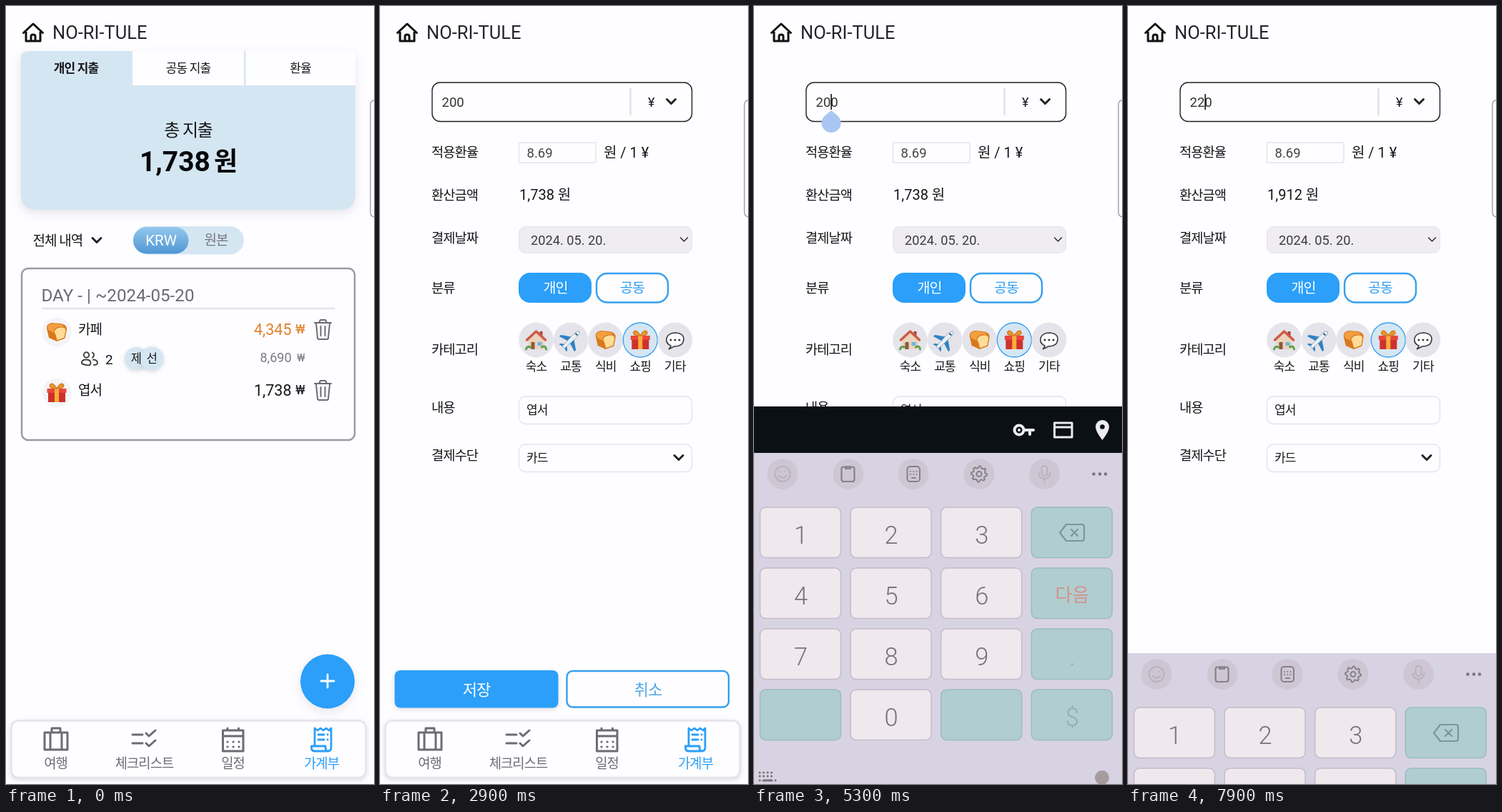
These frames come from a looping animation (515 px wide and 1088 px high, 8 s). An HTML page:

```html
<!DOCTYPE html>
<html lang="ko">
<head>
<meta charset="utf-8">
<style>
html, body { margin: 0; width: 100%; height: 100%; overflow: hidden; background: #fefdff; }
svg { display: block; width: 515px; height: 1088px; }
text { font-family: Roboto, "Noto Sans CJK KR", "Noto Sans CJK", sans-serif; white-space: pre; }
.ko { letter-spacing: -.05em; }
.line { fill: none; stroke-linecap: round; stroke-linejoin: round; }
.soft { filter: drop-shadow(0 5px 7px rgba(40, 50, 70, .11)); }
.near { filter: drop-shadow(0 2px 3px rgba(40, 50, 70, .17)); }
</style>
</head>
<body>
<svg id="stage" viewBox="0 0 515 1088">
  <defs>
    <linearGradient id="pill" x2="0" y2="1">
      <stop stop-color="#93c8ed"/><stop offset="1" stop-color="#4f96d3"/>
    </linearGradient>
    <g id="bread">
      <path d="M-14-5Q-15-11-7-13L5-12Q14-11 14-4L11 9 0 13-11 8Z" fill="#d9781f"/>
      <path d="M-13-6Q-13-11-6-12L5-11Q10-10 10-7L-2-5-4 1-12-3Z" fill="#f2a03f"/>
      <path d="M-4 0Q-4-5 4-7 13-8 13-2L11 8 0 12-2 4Z" fill="#ffdc98" stroke="#d77c20" stroke-width="1.3"/>
    </g>
    <g id="gift">
      <path d="M-12-2H12V13H-12Z" fill="#cf302d"/>
      <path d="M-13.500-6H13.500V0H-13.500Z" fill="#e8463c"/>
      <path d="M-3-6H3V13H-3Z" fill="#f5b03a"/>
      <path d="M0-6Q-12-6-9-12-5-15 0-6 5-15 9-12 12-6 0-6Z" fill="#e9962e" stroke="#d57d22" stroke-width="1.5"/>
    </g>
    <g id="house">
      <path d="M5-12H9V-4H5Z" fill="#a7473c"/>
      <path d="M-11-1 0-10 11-1V13H-11Z" fill="#ead4bd"/>
      <path d="M-13 0 0-12 13 0" class="line" stroke="#cf5a45" stroke-width="3.5"/>
      <path d="M-7 3H-2V13H-7Z" fill="#8d573f"/>
      <path d="M2 3H8V8H2Z" fill="#6fb5dc"/>
      <path d="M-14 13Q-13 8-8 10M14 13Q13 7 8 10" class="line" stroke="#58a149" stroke-width="3"/>
    </g>
    <g id="plane" transform="rotate(45)">
      <path d="M-2-4-15 5V8L-2 4ZM2-4 15 5V8L2 4ZM-2 10-7 14V16L0 14 7 16V14L2 10Z" fill="#2f83c4"/>
      <path d="M0-17Q4-14 3-6L2 15H-2L-3-6Q-4-14 0-17Z" fill="#e9f0f5" stroke="#8fa6b5" stroke-width=".8"/>
      <path d="M-2-11H2" stroke="#305b7c" stroke-width="2"/>
    </g>
    <g id="bubble">
      <path d="M-6 8Q-13 5-12-2-10-10 1-10 13-9 12 0 11 9-1 9L-9 13Q-6 11-6 8Z" fill="#fff" stroke="#3b3b40" stroke-width="1.6"/>
      <path d="M-6 0h.1M0 0h.1M6 0h.1" class="line" stroke="#3b3b40" stroke-width="3"/>
    </g>
  </defs>
  <g id="list"></g>
  <g id="form"></g>
  <g id="nav"></g>
  <g id="head"></g>
  <g id="edit">
    <rect id="caret" y="123" width="1.6" height="22" fill="#111"/>
    <path id="drop" d="M0 146 9.5 154A13.5 13.5 0 1 1-9.5 154Z" fill="#a9c6f3"/>
  </g>
  <rect id="dark" width="515" height="600" fill="#0b1016"/>
  <g id="fill"></g>
  <g id="keys"></g>
</svg>
<script>
const $ = id => document.getElementById(id);
const BLUE = '#2b9ff9', PALE = '#d5e6f3', GREY = '#6d6c71';

// y is the vertical centre of the text
const text = (x, y, s, size, { fill = '#17171a', at = 'start', w = 400, cls = '', id = '' } = {}) =>
  `<text x="${x}" y="${(y + size * .37).toFixed(1)}" font-size="${size}" fill="${fill}" text-anchor="${at}" font-weight="${w}" class="${cls}" id="${id}">${s}</text>`;
const ko = (x, y, s, size, o = {}) => text(x, y, s, size, { cls: 'ko', ...o });
const mid = (x, y, s, size, o = {}) => ko(x, y, s, size, { at: 'middle', ...o });
const box = (x, y, w, h, r, fill, stroke = 'none', sw = 0, cls = '') =>
  `<rect x="${x}" y="${y}" width="${w}" height="${h}" rx="${r}" fill="${fill}" stroke="${stroke}" stroke-width="${sw}" class="${cls}"/>`;
const disc = (x, y, r, fill, more = '') => `<circle cx="${x}" cy="${y}" r="${r}" fill="${fill}" ${more}/>`;
const line = (d, stroke = GREY, w = 2.5, more = '') =>
  `<path d="${d}" class="line" stroke="${stroke}" stroke-width="${w}" ${more}/>`;
const icon = (name, x, y) => `<use href="#${name}" x="${x}" y="${y}"/>`;
const arrow = (x, y, r, w) => line(`M${x - r} ${y - r / 2}l${r} ${r} ${r}-${r}`, '#222', w);

const trash = y => line(`M432 ${y - 9}h23M438 ${y - 9}l2-4h7l2 4M434 ${y - 8}l2 20q0 2 2 2h11q2 0 2-2l2-20M440.500 ${y - 4}v13M446.500 ${y - 4}v13`, GREY, 2);
const won = (y, num, size, fill) =>
  text(399.5, y, num, size, { fill, at: 'end' }) + text(418.5, y, '₩', size * .84, { fill, at: 'end' });

$('head').innerHTML =
  line('M24.500 37.500 38 25 51.500 37.500M28 36V49H48V36M35 49V42.500Q35 40 38 40T41 42.500V49', '#111', 3) +
  text(65, 36.500, 'NO-RI-TULE', 25.5, { fill: '#242428' }) +
  box(510, 131.500, 20, 163.500, 6, '#fefdff', '#98979c', 1.3);

$('list').innerHTML =
  `<g class="soft"><path d="M20.500 73Q20.500 63 31 63H479Q489 63 489 73V263Q489 285 467 285H43Q20.500 285 20.500 263Z" fill="#fefdff"/>
   <path d="M20.500 73Q20.500 63 31 63H177V111H489V263Q489 285 467 285H43Q20.500 285 20.500 263Z" fill="${PALE}"/></g>` +
  box(333, 63, 2.5, 49, 0, PALE) +
  mid(98, 86.500, '개인 지출', 17, { w: 700 }) + mid(255, 86.500, '공동 지출', 17) + mid(412, 86.500, '환율', 17) +
  mid(255, 173, '총 지출', 24) +
  text(286, 217, '1,738', 39, { at: 'end', w: 700, fill: '#08080a' }) + text(291, 217, '원', 36, { w: 700, fill: '#08080a' }) +
  ko(37.500, 327.500, '전체 내역', 19) + arrow(127, 327.500, 6, 3) +
  box(178, 308, 155, 39.5, 19.7, PALE) + box(178, 309, 77.5, 37.5, 18.7, 'url(#pill)') +
  mid(217, 327, 'KRW', 20.5, { fill: '#fff', cls: '' }) + mid(294, 326.500, '원본', 19, { fill: '#77767b' }) +
  box(22, 367, 466, 240, 9, 'none', '#9b9a9f', 2.5) +
  text(49.500, 403.500, 'DAY - | ~2024-05-20', 24.2, { fill: '#6c6b70' }) +
  line('M51 423H459', '#e3e2e8', 2.5) +
  [['bread', '카페', 456], ['gift', '엽서', 541]].map(([name, s, y]) =>
    disc(71, y, 20.5, '#f4f4f6') + icon(name, 71, y) + ko(101, y - 4.5, s, 19) + trash(y - 4)).join('') +
  won(451.500, '4,345', 21.5, '#e4802c') + won(491, '8,690', 18, '#7c7b80') + won(536.500, '1,738', 21.5, '#17171a') +
  line('M106 499Q106 494.500 112 494.500T118.500 499 112 502 106 499ZM122 494.500Q128 495 128 499 128 502 123 502M121 484.500A4 4 0 0 1 121 491.500', '#444', 2) +
  disc(112.500, 488, 3.7, 'none', 'stroke="#444" stroke-width="2"') +
  text(139, 493.500, '2', 19) +
  disc(182, 493, 16, PALE, 'class="near"') + disc(204, 493, 16.5, PALE, 'class="near"') +
  mid(182, 493, '제', 16.5) + mid(204, 493, '선', 16.5) +
  disc(450, 944.500, 38, BLUE, 'class="soft"') + line('M441 944H459M450 935V953', '#fff', 2.8);

const rows = { 적용환율: 204, 환산금액: 264, 결제날짜: 324, 분류: 394, 카테고리: 480, 내용: 561, 결제수단: 628 };
const kinds = [['house', '숙소'], ['plane', '교통'], ['bread', '식비'], ['gift', '쇼핑'], ['bubble', '기타']];
$('form').innerHTML =
  box(73, 107, 363.5, 54.5, 11, '#fefdff', '#222', 1.4) + line('M350.500 116V152', '#e2e1e6', 2.5) +
  text(86.500, 134, '200', 18.5, { id: 'sum', fill: '#333' }) + text(375, 134, '¥', 18) + arrow(407.500, 133.500, 6, 3) +
  Object.entries(rows).map(([s, y]) => ko(72, y, s, 18.7)).join('') +
  box(194.500, 191, 107.5, 28, 1, '#fefdff', '#e4e3e8', 1.4) + text(205.500, 205, '8.69', 18.5, { fill: '#444' }) +
  text(313, 204.500, '원 / 1 ¥', 20) + text(195, 264, '1,738 원', 20, { id: 'won' }) +
  box(194.500, 308.500, 242, 37, 9, '#efedf0', '#e5e3e7', 1) +
  text(211, 327, '2024. 05. 20.', 18.2, { fill: '#3c3c40' }) + arrow(425.500, 326.500, 5, 1.4) +
  box(194, 373, 102, 42, 16, BLUE) + mid(245.500, 394, '개인', 19.5, { fill: '#fff' }) +
  box(303, 374, 100, 40.5, 15, '#fefdff', '#359fee', 2.4) + mid(353, 394, '공동', 19.5, { fill: '#359fee' }) +
  kinds.map(([name, s], i) => {
    const x = 218.5 + i * 48.6, on = name === 'gift';
    return disc(x, 467, on ? 24 : 24.4, on ? PALE : '#e5e4ea', on ? 'stroke="#359fee" stroke-width="1.3"' : '') +
      icon(name, x, 467) + mid(x, 504, s, 17);
  }).join('') +
  box(194.500, 546, 242, 38.5, 9, '#fefdff', '#e4e3e8', 1.4) + ko(205, 565, '엽서', 17) +
  box(194.500, 613, 242, 38.5, 9, '#fefdff', '#e4e3e8', 1.4) + ko(205, 632, '카드', 17) + arrow(418, 631.500, 6, 3) +
  box(20.500, 929, 229, 52.5, 8, BLUE, 'none', 0, 'near') + mid(135, 955.500, '저장', 22, { fill: '#fff' }) +
  box(261.500, 930, 226.5, 50.5, 8, '#fefdff', '#359fee', 2.4) + mid(375, 955.500, '취소', 22, { fill: '#4da6e8' });

$('nav').innerHTML =
  box(7.500, 999.500, 496, 79.5, 10, '#fefdff', '#e6e4ea', 2.5, 'near') +
  line('M54 1016H86V1040H54ZM62 1016V1040M78 1016V1040M64 1015V1010H76V1015', GREY, 3) +
  line('M177 1019H191M177 1031H191M196 1017l4 4 9-8M196 1031l4 4 9-8', GREY, 3) +
  line('M303.500 1013H332V1042H303.500ZM303.500 1021H332M310 1010V1013M325.500 1010V1013', GREY, 3) +
  line('M310 1029h.1M318 1029h.1M326 1029h.1M310 1036h.1M318 1036h.1M326 1036h.1', GREY, 3.2) +
  line('M432 1034V1010l4 3 4-3 4 3 4-3 4 3 3-3V1037Q455 1042 450.500 1042 447 1042 447 1035H427.500V1038Q428 1042 432 1042H450M437 1019H445M437 1026H445M450 1019h.1M450 1026h.1', BLUE, 2.8) +
  ['여행', '체크리스트', '일정', '가계부'].map((s, i) =>
    mid(69.5 + i * 124, 1059, s, 18.8, { fill: i === 3 ? BLUE : GREY })).join('');

const LIT = '#ececf0';
$('fill').innerHTML =
  disc(371, 593, 6.5, 'none', `stroke="${LIT}" stroke-width="4"`) + disc(371, 593, 2, LIT) +
  line('M379 593H391M386 594V599', LIT, 4) +
  line('M420.500 583H445V603H420.500ZM421 589H445', LIT, 3) +
  `<path d="M487.500 607Q478 595 478 588.500A9.500 9.500 0 0 1 497 588.500Q497 595 487.500 607Z" fill="${LIT}"/>` + disc(487.500, 588.500, 3.3, '#0b1016');

// Keypad, drawn at its raised position
const INK = '#85818a', FAINT = '#b9b2bf';
const labels = ['1', '2', '3', '', '4', '5', '6', '다음', '7', '8', '9', '.', '', '0', '', '$'];
const gear = Array.from({ length: 33 }, (_, i) => {
  const a = i * Math.PI / 16, r = i % 4 < 2 ? 11 : 8.5;
  return (i ? 'L' : 'M') + (315 + r * Math.cos(a)).toFixed(1) + ' ' + (654.5 + r * Math.sin(a)).toFixed(1);
}).join('');
$('keys').innerHTML =
  box(0, 625, 515, 470, 0, '#d8d3e2') +
  [40, 132, 223, 315, 406.5].map(x => disc(x, 654.5, 21.5, '#cec7d3')).join('') +
  disc(40, 654.500, 10.5, 'none', `stroke="${FAINT}" stroke-width="2"`) +
  line('M35 657Q40 663 45 657M36.500 651h.1M43.500 651h.1', FAINT, 2) +
  box(122.500, 644.500, 18, 20.5, 3, 'none', INK, 2.2) + line('M128 644.500H135V647H128Z', INK, 2.2) +
  box(214.500, 644, 17.5, 21, 4, 'none', INK, 2) +
  line('M219 651h.1M223.200 651h.1M227.500 651h.1M219 655h.1M223.200 655h.1M227.500 655h.1M221 660H226', INK, 2) +
  line(gear, INK, 2) + disc(315, 654.500, 3.5, 'none', `stroke="${INK}" stroke-width="2"`) +
  box(402.500, 643, 8, 14, 4, 'none', FAINT, 2) + line('M398.500 653Q399 661 406.500 661T414.500 653M406.500 661V666', FAINT, 2) +
  [475.5, 484, 492].map(x => disc(x, 654.5, 2.2, '#77737c')).join('') +
  labels.map((s, i) => {
    const c = i % 4, x = 8.5 + c * 126.6, y = 701 + (i >> 2) * 85, green = c === 3 || i === 12 || i === 14;
    const word = s === '다음';
    const o = { at: 'middle', w: 300, fill: c < 3 ? '#77737a' : word ? '#d6918f' : '#91aeb1' };
    return box(x, y, 113, 70.5, 8, green ? '#b0cecf' : '#efe9ed', green ? '#9bbcc0' : '#c5bbca', 1.5) +
      text(x + 57, y + (word ? 37 : 38.5), s, word ? 26 : 34.5, o);
  }).join('') +
  line('M428 736.500 437 725H459Q462 725 462 728V745Q462 748 459 748H437ZM444 732l9 9M453 732l-9 9', '#7d9699', 2.2) +
  line('M8 1072H30M8 1077H30', '#77737a', 3, 'stroke-dasharray="0.1 5.4"') +
  line('M8 1083h.1M13 1083H25M30 1083h.1', '#77737a', 3) +
  disc(487, 1079, 10, '#a59c9e');

// [from ms, amount, converted, caret position, drop visible]
const edits = [
  [0, '200', '1,738', 3, false],
  [3900, '200', '1,738', 3, true],
  [5000, '200', '1,738', 2, true],
  [6000, '20', '174', 1, false],
  [6700, '220', '1,912', 2, false]
];
const STEP = 100, OPEN = 2500, TAP = 3900, BAR = 4400, CLOSE = 7700;
// [ms, keypad offset]
const slide = [[TAP, 463], [4000, 379], [4100, 170], [4200, 50], [4300, 0], [CLOSE, 0], [7800, 95], [7900, 280], [8000, 420]];

function offset(t) {
  const i = slide.findIndex(s => s[0] > t);
  if (i < 1) return 463;
  const [a, p] = slide[i - 1], [b, q] = slide[i];
  return p + (q - p) * (t - a) / (b - a);
}
const show = (id, on) => $(id).setAttribute('visibility', on ? 'visible' : 'hidden');

function draw(t) {
  const [since, sum, total, pos, drop] = edits.filter(e => e[0] <= t).pop();
  const typing = t >= TAP, bar = t >= BAR && t < CLOSE;
  show('list', t < OPEN);
  show('form', t >= OPEN);
  $('sum').textContent = sum;
  $('won').textContent = total + ' 원';
  const x = 86.8 + pos * 10.4;
  $('caret').setAttribute('x', x - .3);
  show('caret', typing && (t - since) % 1000 < 500);
  $('drop').setAttribute('transform', `translate(${x + .5})`);
  show('drop', drop);
  $('dark').setAttribute('y', bar ? 560 : 625);
  show('dark', typing && t < CLOSE);
  show('fill', bar);
  show('keys', typing);
  $('keys').setAttribute('transform', `translate(0 ${offset(t)})`);
}
// The picture advances in steps of 100 ms
function tick() {
  draw(Math.floor(performance.now() % 8000 / STEP) * STEP);
  requestAnimationFrame(tick);
}
tick();
</script>
</body>
</html>
```
